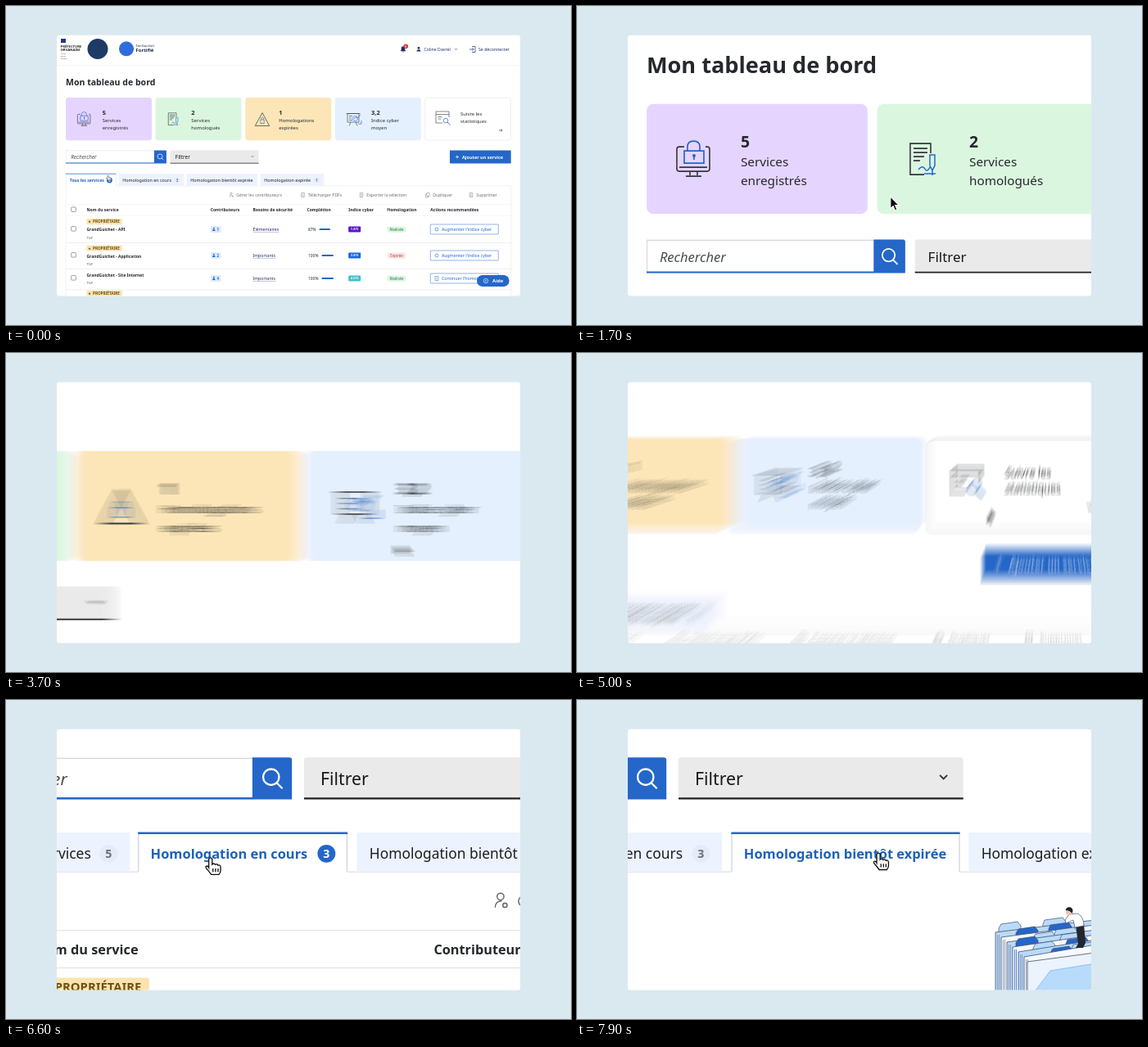
Animation, 690 px wide and 390 px high, one loop 8000 ms. Source, as an HTML page with a canvas:

```html
<!DOCTYPE html>
<html lang="fr">
<head>
<meta charset="utf-8">
<title>Tableau de bord</title>
<style>
  html, body { margin: 0; width: 100%; height: 100%; overflow: hidden; background: #dae9f0; }
  canvas { display: block; width: 690px; height: 390px; }
</style>
</head>
<body>
<canvas id="stage"></canvas>
<script>
const W = 690, H = 390, LOOP = 8000, SHUTTER = 18, SAMPLES = 22;
const BLUE = '#2467c9', INK = '#25282d', GREY = '#6b6b6b', LINE = '#dfdfe6', NAVY = '#1d2440';
const FONT = '"Noto Sans", "Open Sans", sans-serif';
const dpr = window.devicePixelRatio || 1;
const stage = document.getElementById('stage');
const layer = document.createElement('canvas');
for (const c of [stage, layer]) { c.width = W * dpr; c.height = H * dpr; }
const out = stage.getContext('2d');
const g = layer.getContext('2d');

// [start, end, easing power, scale, x, y]
const CAMERA = [
  [0, 0, 1, 1, 0, 0],
  [20, 829, 1.2, 2.57, -102.6, -168],
  [1690, 2120, 3, 2.57, -259, -168],
  [2580, 3100, 3, 2.57, -541, -168],
  [3410, 4020, 3, 2.57, -822.6, -168],
  [4480, 4800, 3, 2.57, -916, -168],
  [4880, 5155, 2.5, 1.35, -203, -75],
  [5155, 5800, 3, 3.22, -137.6, -498],
  [5980, 6400, 3, 3.22, -281.6, -498],
  [6600, 7100, 3, 3.22, -521.6, -498]
];
// [start, end, easing power, x, y]
const POINTER = [
  [0, 0, 3, 124.5, 207],
  [560, 980, 3, 137, 156],
  [1620, 1780, 3, 237, 156],
  [2520, 2720, 3, 345, 156],
  [3350, 3600, 3, 445, 156],
  [4450, 4700, 3, 545, 154],
  [5200, 5750, 3, 104, 213],
  [5980, 6200, 3, 165, 214.5],
  [6640, 6900, 3, 261, 213.5],
  [7830, 7895, 3, 276.3, 212.7]
];

const ease = (u, k) => u < .5 ? (2 * u) ** k / 2 : 1 - (2 - 2 * u) ** k / 2;

function follow(track, t) {
  let v = track[0].slice(3);
  for (const [a, b, k, ...to] of track.slice(1)) {
    if (t <= a) break;
    const p = ease(Math.min(1, (t - a) / (b - a)), k);
    v = v.map((x, i) => x + (to[i] - x) * p);
  }
  return v;
}

// Drawn large and scaled down so that glyph advances stay precise.
function text(s, x, y, size, color = INK, style = '', align = 'left') {
  g.save();
  g.translate(x, y);
  g.scale(.1, .1);
  g.font = `${style} ${size * 10}px ${FONT}`;
  g.textAlign = align;
  g.fillStyle = color;
  g.fillText(s, 0, 0);
  g.restore();
}
const bold = (s, x, y, size, color, align) => text(s, x, y, size, color, 'bold', align);

function paint(path, fill, stroke, width) {
  if (fill) { g.fillStyle = fill; g.fill(path); }
  if (stroke) { g.strokeStyle = stroke; g.lineWidth = width; g.stroke(path); }
}
const draw = (d, stroke, width = .6, fill) => paint(new Path2D(d), fill, stroke, width);

function box(x, y, w, h, fill, r = 0, stroke, width = .5) {
  const p = new Path2D();
  p.roundRect(x, y, w, h, r);
  paint(p, fill, stroke, width);
}
function dot(x, y, r, fill, stroke, width = .6) {
  const p = new Path2D();
  p.arc(x, y, r, 0, 7);
  paint(p, fill, stroke, width);
}
function at(x, y, scale, fn) {
  g.save();
  g.translate(x, y);
  g.scale(scale, scale);
  fn();
  g.restore();
}

function header() {
  box(67, 40, 6, 5, '#26348b');
  bold('PRÉFECTURE', 66.5, 50.5, 4.2, '#222');
  bold('ORVANAISE', 66.5, 55.3, 4.2, '#222');
  ['Clarté', 'Équité', 'Solidité'].forEach((s, i) => text(s, 66.5, 59 + i * 2.8, 2.5, '#555', 'italic'));
  dot(112, 52.5, 12.5, '#1e3a66');
  dot(147, 52.3, 9, '#2f6ce0');
  text('TonGuichet', 158.5, 49.8, 4.2, NAVY);
  bold('Fortifié', 158.5, 56.2, 6, NAVY);
  draw('M482 55H488L487 53.6V51.500A2 2 0 0 0 483 51.500V53.6ZM484 56h2', '#22286a', .5, '#22286a');
  dot(488.3, 49.3, 2.8, '#d8333e');
  bold('6', 488.3, 50.6, 3.4, '#fff', 'center');
  dot(504, 51.3, 1.4, '#22286a');
  draw('M501.500 55.500Q501.500 53.200 504 53.200T506.500 55.500Z', 0, 0, '#22286a');
  text('Coline Davrel', 510.5, 54.8, 5.2, '#22286a');
  draw('M548 52l1.500 1.500 1.500-1.500', '#22286a', .6);
  draw('M569 49.500H573V56.500H569M566 53H571M569.500 51.300L571.200 53 569.500 54.700', '#22286a', .7);
  text('Se déconnecter', 577, 54.8, 5.2, '#22286a');
  box(62, 72, 566, .5, '#e9e9ee');
}

const CARDS = [
  [73, '#e5d5fe', 44.7, '5', 'Services', 'enregistrés'],
  [182.5, '#dbf6df', 43.8, '2', 'Services', 'homologués'],
  [292.3, '#fce6b7', 41, '1', 'Homologations', 'expirées'],
  [402, '#e4f0fe', 44, '3,2', 'Indice cyber', 'moyen']
];

function icons() {
  const ink = '#33363c';
  at(39.9, 65.4, 1 / 2.57, () => {
    draw('M131 172H125Q122 172 122 175V199Q122 202 125 202H159Q162 202 162 199V175Q162 172 159 172H157M138 202V207M147 202V207M133 208H152M125 197H159', ink, 1.6);
    draw('M135 177V172Q135 165 142.500 165T150 172V177M131 177H155V192H131ZM143 184V188', BLUE, 1.7);
    dot(143, 183, 2, BLUE);
    draw('M432 180V168H407V206H424M411 174H428M411 179H428M411 184H424M411 189H419', ink, 1.6);
    draw('M431 182h6v13l-3 6-3-6ZM434 201V207M417 200q5-6 8-1t6-2M424 205h14', BLUE, 1.5);
  });
  draw('M313 130.500L321.700 146.500H304.300Z', ink, .7);
  draw('M310.800 139h4.400v4.500h-4.400ZM311.600 139v-1.500a1.400 1.400 0 0 1 2.800 0V139', BLUE, .6);
  draw('M417 131.500H431V142H417ZM415.500 131.500H432.500M421 142L419 146.500M427 142L429 146.500M419 134.500h4M419 137h3M419 139.500h4', ink, .6);
  draw('M425 138l2-2.500 2 1.500 4-4M430 144h4v-4', BLUE, .7);
  dot(426.5, 137.5, 3, 0, BLUE);
  draw('M533 143H525V129H541V136M525 132.500H541M527.500 135.500h5M527.500 138h4', ink, .6);
  dot(537, 140, 2.8, 0, BLUE, .7);
  draw('M539 142L542.500 145.500', BLUE, .9);
}

function overview() {
  bold('Mon tableau de bord', 73, 97.2, 10.55);
  for (const [x, fill, dx, num, a, b] of CARDS) {
    box(x, 112, 105, 52.3, fill, 3.2);
    bold(num, x + dx, 132.7, 7.5);
    text(a, x + dx, 141.6, 5.95);
    text(b, x + dx, 150.6, 5.95);
  }
  box(511.7, 112.2, 104.8, 52, '#fff', 3.2, '#dedee4');
  text('Suivre les', 555, 134, 5.9);
  text('statistiques', 555, 143, 5.9);
  draw('M602 152H606M604.500 150.500L606 152 604.500 153.500', INK, .6);
  icons();
}

function filters() {
  box(73.2, 176.8, 108, 15.4, '#fff', 0, '#d4d4da', .4);
  box(73, 191.6, 108, .8, BLUE);
  text('Rechercher', 79.2, 187.1, 6.4, '#4a4a4a', 'italic');
  box(180.9, 176.5, 15, 15.9, BLUE, [0, 1, 0, 0]);
  dot(188, 183.9, 3, 0, '#fff', .7);
  draw('M190.200 186.200L192.300 188.300', '#fff', .7);
  box(200.5, 176.5, 108, 15.9, '#eaeaea', [1, 1, 0, 0]);
  box(200.5, 191.7, 108, .7, '#222');
  text('Filtrer', 206.7, 187, 6.6, '#181818');
  draw('M299.600 183.200L301 184.600 302.400 183.200', '#333', .6);
  box(542, 176.5, 74.7, 15.9, BLUE, .6);
  draw('M549 184.500H553M551 182.500V186.500', '#fff', .7);
  bold('Ajouter un service', 557, 186.6, 5.5, '#fff');
}

// [left, right, label, count, badge x]
const TABS = [
  [73, 134.5, 'Tous les services', '5', 126.4],
  [137.5, 217, 'Homologation en cours', '3', 209],
  [220.5, 307.2, 'Homologation bientôt expirée', '', 0],
  [310.5, 388, 'Homologation expirée', '1', 379.5]
];

function tabs(active) {
  box(73, 219.9, 543.7, 140, '#fff', 0, LINE, .4);
  TABS.forEach(([l, r, label, count, bx], i) => {
    const on = i === active;
    if (on) {
      box(l, 205, r - l, 15.4, '#fff');
      draw(`M${l + .2} 219.900V205M${r - .2} 219.900V205`, '#cfd3e0', .4);
      box(l, 204.8, r - l, .8, BLUE);
      bold(label, l + 4.8, 214.9, 5.1, '#1f61b8');
    } else {
      box(l, 205, r - l, 14.8, '#edf3fe');
      text(label, l + 4.8, 214.9, 5.4, '#1e1e1e');
    }
    if (count) {
      dot(bx, 213, 3.4, on ? BLUE : '#e5ebf8');
      bold(count, bx, 214.6, 4.4, on ? '#fff' : '#6d7280', 'center');
    }
  });
}

const TOOLS = [
  [275, 'Gérer les contributeurs'], [362.5, 'Télécharger PDFs'], [434, 'Exporter la sélection'],
  [515, 'Dupliquer'], [568, 'Supprimer']
];
const HEADS = [
  [98.5, 'Nom du service'], [249.7, 'Contributeurs'], [301.5, 'Besoins de sécurité'], [367.5, 'Complétion'],
  [418.2, 'Indice cyber'], [465.3, 'Homologation'], [518.3, 'Actions recommandées']
];
const ROWS = [
  { y: 273, badge: 263.7, name: 'API', users: 1, need: 'Élémentaires', done: 87, score: '1.8/5', tint: '#5b16c4', ok: true, action: 'Augmenter l’indice cyber' },
  { y: 305, badge: 296, name: 'Application', users: 2, need: 'Importants', done: 100, score: '3.8/5', tint: '#1a66d0', ok: false, action: 'Augmenter l’indice cyber' },
  { y: 333, name: 'Site Internet', users: 4, need: 'Importants', done: 100, score: '4.0/5', tint: '#42c0cc', ok: true, action: 'Continuer l’homologation' }
];

function tools() {
  TOOLS.forEach(([x, label], i) => {
    if (i === 0) {
      dot(x, 229.3, 1.3, 0, GREY, .45);
      draw(`M${x - 2} 233.500q0-2.500 2.500-2.500`, GREY, .45);
      dot(x + 1.7, 232.6, .8, 0, GREY, .5);
    } else if (i === 3) {
      draw(`M${x - 1} 228.500h3v4h-3ZM${x - 1} 230h-1.500v4h3v-1.500`, GREY, .45);
    } else {
      draw(`M${x - 1.8} 228.500h3.600v5h-3.600ZM${x - .8} 230.500h1.600M${x - .8} 232h1.600`, GREY, .45);
    }
    text(label, x + 6.3, 232.8, 5.1, GREY);
  });
}

const check = y => box(79.7, y - 2.8, 5.6, 5.6, '#fff', 1, '#444', .5);

function owner(y) {
  box(98.5, y - 3.6, 43.2, 7.2, '#fce3ae', .8);
  bold('★', 100.3, y + 1.5, 3.8, '#6b5012');
  bold('PROPRIÉTAIRE', 106, y + 1.5, 4.6, '#6b5012');
}

function row(r) {
  const { y } = r, nameY = r.badge ? r.badge + 11.6 : 330.8;
  check(y - .7);
  if (r.badge) owner(r.badge);
  bold('GrandGuichet - ' + r.name, 98.5, nameY, 4.95);
  text('TGF', 98.5, nameY + 9.3, 4.3, '#555');
  box(250, y - 4, 12.5, 8, '#dcebfe', 1.2);
  dot(253.8, y - 1.2, 1, BLUE);
  draw(`M252 ${y + 2}q0-2 1.800-2t1.800 2Z`, 0, 0, BLUE);
  bold(r.users, 257.5, y + 1.7, 4.4, BLUE);
  text(r.need, 301.5, y + 1.8, 5.2, '#22286a');
  box(301.5, y + 3.4, r.need.length > 10 ? 32 : 28, .4, '#22286a');
  text(r.done + '%', 369, y + 1.8, 4.9);
  box(r.done < 100 ? 382.5 : 385.5, y - .9, r.done < 100 ? 13.5 : 14.5, 1.8, BLUE, .9);
  box(418.2, y - 3.6, 15, 7.2, r.tint, 1);
  bold(r.score, 425.7, y + 1.4, 4, '#fff', 'center');
  box(465.5, y - 3.6, 23, 7.4, r.ok ? '#dbf6e1' : '#fbe4e4', 3);
  text(r.ok ? 'Réalisée' : 'Expirée', 477, y + 1.5, 4.4, r.ok ? '#2f7a45' : '#a04a4a', '', 'center');
  box(518.3, y - 6, 83, 12, '#fff', .6, BLUE, .5);
  if (r.badge) dot(526, y, 2, 0, BLUE, .6);
  else draw(`M524 ${y - 2.5}h4v5h-4ZM525 ${y}h2`, BLUE, .5);
  text(r.action, 532, y + 1.8, 5.25, BLUE);
}

function table() {
  tools();
  for (const y of [242, 256.2, 289.3, 321.3, 346.8]) box(73, y, 543.7, .35, LINE);
  check(248.7);
  for (const [x, s] of HEADS) bold(s, x, 251.2, 5.05);
  ROWS.forEach(row);
  owner(351.3);
}

function emptyState() {
  const pale = '#b9dbfb', edge = '#44506a';
  at(162, 154.66, 1 / 3.22, () => {
    for (let i = 0; i < 6; i++) {
      const x = 511 + i * 7, y = 284 + i * 6;
      const lift = i % 3 * 14;
      draw(`M${x + 4 + lift} ${y - 5}l3-5 20-3 4 5v8h-27Z`, edge, .7, i % 2 ? BLUE : pale);
      draw(`M${x + 58} ${y - 10}l2-5 22-3 4 5v9h-28Z`, edge, .7, i % 3 === 1 ? BLUE : pale);
      draw(`M${x} ${y}L640 ${y - 16}V380H${x}Z`, edge, .8, i % 2 ? '#f6f9fe' : pale);
      draw(`M${x + 2.5} ${y + 3}V380M${x + 4.5} ${y + 3}V380`, i === 3 ? BLUE : '#7f8aa0', .8);
    }
    draw('M550 320L640 308V380H550Z', edge, .8, '#eaf3fe');
    draw('M560 380V355L578 331 640 321V380Z', '#7fb2ea', .8, pale);
    draw('M609 275L619 274 621 297 618 303H609L612 298Z', 0, 0, '#23262e');
    draw('M601 262L612 261Q619 266 619 276L608 278 606 269 597 273 596 269Z', edge, .7, '#fff');
    dot(601, 259, 4, '#e9c6b0');
    draw('M596.500 257Q598 252 603 253.500 607 256 604.500 261 602 257 596.500 257Z', 0, 0, '#1d2027');
  });
}

function help() {
  box(575, 329, 39.6, 14, BLUE, 7);
  dot(586, 336, 2.7, 0, '#fff', .6);
  bold('?', 586, 337.6, 4.2, '#fff', 'center');
  bold('Aide', 594, 338.2, 6, '#fff');
}

function pointer([x, y]) {
  if (y > 200) {
    at(x, y, .32, () => draw(
      'M-2 1.500Q0-1 2 1.500V8Q4 6 5.500 8.300 7.500 6.800 9 9.200 11.500 8 12 11V15Q12 18 10 20H1Q-2 16-5 12.500-6.500 10-4 10-3 10-2 12Z' +
      'M3 13v4M6 13v4M9 13v4', '#111', 1.3, '#fff'));
  } else {
    at(x, y, .37, () => draw('M0 0V15.500L3.500 12.300 6 18 8.700 16.800 6.200 11.300H11Z', '#fff', 1.2, '#0a0a0a'));
  }
}

function scene(cam, tab, mouse) {
  const [s, tx, ty] = cam;
  g.setTransform(dpr, 0, 0, dpr, 0, 0);
  g.fillStyle = '#dae9f0';
  g.fillRect(0, 0, W, H);
  g.save();
  g.beginPath();
  g.roundRect(62, 35.7, 566, 318.8, 3);
  g.clip();
  g.fillStyle = '#fff';
  g.fillRect(62, 35, 566, 320);
  g.translate(tx, ty);
  g.scale(s, s);
  header();
  overview();
  filters();
  tabs(tab);
  if (tab < 2) table(); else emptyState();
  help();
  pointer(mouse);
  g.restore();
}

function render(t) {
  const tab = t < 6200 ? 0 : t < 7400 ? 1 : 2;
  const mouse = follow(POINTER, t);
  const from = follow(CAMERA, t - SHUTTER / 2), to = follow(CAMERA, t + SHUTTER / 2);
  const moving = Math.abs(to[0] - from[0]) > .002 || Math.abs(to[1] - from[1]) > .5;
  const n = moving ? SAMPLES : 1;
  for (let i = 0; i < n; i++) {
    const offset = n > 1 ? (i / (n - 1) - .5) * SHUTTER : 0;
    scene(follow(CAMERA, t + offset), tab, mouse);
    out.globalAlpha = 1 / (i + 1);
    out.drawImage(layer, 0, 0);
  }
}

const begin = performance.now();
function tick() {
  render((performance.now() - begin) % LOOP);
  requestAnimationFrame(tick);
}
tick();
</script>
</body>
</html>
```
